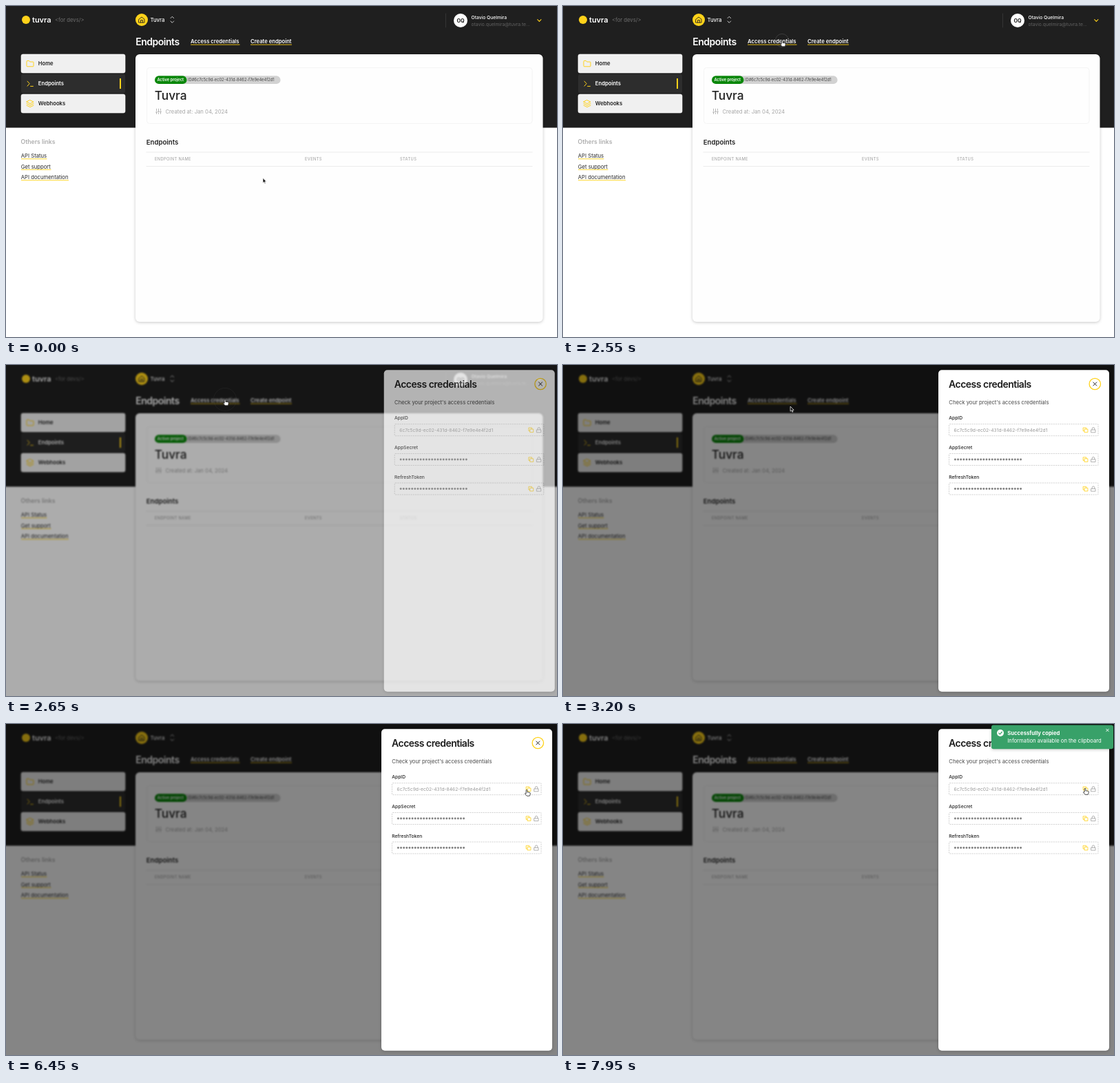
Write an HTML page that moves like this. It is 800 px wide and 480 px high and loops after 8000 ms.

```html
<!DOCTYPE html>
<html lang="en">
<head>
<meta charset="utf-8">
<title>Access credentials</title>
<style>
html, body { margin: 0; width: 100%; height: 100%; overflow: hidden; background: #fff; }
svg { display: block; width: 100vw; height: 100vh; }
text { font-family: Inter, sans-serif; white-space: pre; }
#card, #panel, #toast rect { filter: drop-shadow(0 1px 2px rgba(0,0,0,.22)); }
</style>
</head>
<body>
<svg id="stage" viewBox="0 0 800 480"></svg>
<script>
const LOOP = 8000;
const YELLOW = '#ffd21a';
const ID = '6c7c5c9d-ec02-431d-8462-f7e9e4e4f2d1';

const text = (x, y, size, fill, str, weight = 400, extra = '') =>
  `<text x="${x}" y="${y}" font-size="${size}" fill="${fill}" font-weight="${weight}" ${extra}>${str}</text>`;
const rect = (x, y, w, h, fill, r = 0, extra = '') =>
  `<rect x="${x}" y="${y}" width="${w}" height="${h}" rx="${r}" fill="${fill}" ${extra}/>`;
const circle = (x, y, r, fill, extra = '') =>
  `<circle cx="${x}" cy="${y}" r="${r}" fill="${fill}" ${extra}/>`;
const line = (d, color, width = 1, extra = '') =>
  `<path d="${d}" fill="none" stroke="${color}" stroke-width="${width}" stroke-linecap="round" stroke-linejoin="round" ${extra}/>`;
const at = (x, y, body) => `<g transform="translate(${x} ${y})">${body}</g>`;
const tracking = n => `letter-spacing="${n}"`;

function header() {
  return rect(-20, -20, 840, 196.5, '#1f1f1f') +
    circle(29, 20, 6, YELLOW) +
    text(38, 24, 11, '#fff', 'tuvra', 600) +
    text(71, 23.3, 7.68, '#6e6e6e', '&lt;for devs/&gt;') +
    circle(197, 20, 9, YELLOW) +
    at(197, 20, line('M-4 -.8L0 -4L4 -.8V4H-4ZM-1.4 4V.5H1.4V4', '#222', .9)) +
    text(209.5, 22.7, 7.68, '#fff', 'Tuvra', 500) +
    line('M239 17.6L241.3 15.3L243.6 17.6M239 22L241.3 24.3L243.6 22', '#ddd', .9) +
    line('M638.5 11V31', '#3a3a3a', .8) +
    circle(660, 21, 10, '#fff') +
    text(660, 23.6, 7.2, '#222', 'OQ', 700, 'text-anchor="middle"') +
    text(675.5, 18.6, 6.72, '#fff', 'Otavio Quelmira', 500) +
    text(675.5, 28.6, 6.72, '#626262', 'otavio.quelmira@tuvra.te...') +
    line('M771.7 19.7L774.3 22.3L776.9 19.7', YELLOW, 1.1) +
    text(188.3, 57, 14, '#fff', 'Endpoints', 600, tracking(-.5)) +
    text(268, 54.3, 7.68, '#fff', 'Access credentials', 600) +
    text(355, 54.3, 7.68, '#fff', 'Create endpoint', 600) +
    rect(268, 55.6, 71.5, .9, YELLOW) + rect(355, 55.6, 60, .9, YELLOW);
}

function sidebar() {
  const item = (y, label, icon, active) =>
    rect(22, y, 151, 27, active ? '#2d2d2d' : '#f0f0f0', 2.5, active ? '' : 'stroke="#fff" stroke-width=".6"') +
    at(35, y + 13.6, line(icon, YELLOW, 1)) +
    text(46.8, y + 16.4, 7.68, active ? '#fff' : '#222', label, 600);
  const link = (y, label, width) =>
    text(21.8, y, 7.68, '#2a2a2a', label) + rect(22, y + 1.3, width, .9, YELLOW);
  return item(70, 'Home', 'M-5 -3.4Q-5 -4.2-4.2 -4.2H-1.6L-.2 -2.6H4.2Q5 -2.6 5 -1.8V3.4Q5 4.2 4.2 4.2H-4.2Q-5 4.2-5 3.4Z') +
    item(99, 'Endpoints', 'M-4 -3.5L-.8 0L-4 3.5M.6 3.8H4.4', true) +
    rect(165, 105, 2, 15, YELLOW) +
    item(128, 'Webhooks', 'M0 -5L5 -2.5L0 0L-5 -2.5ZM-5 0L0 2.5L5 0M-5 2.5L0 5L5 2.5') +
    text(21.6, 200.4, 8.64, '#adadad', 'Others links', 600) +
    link(220, 'API Status', 37.5) + link(235.5, 'Get support', 43.5) + link(251, 'API documentation', 69);
}

function card() {
  const head = (x, label) => text(x, 224.3, 5.76, '#9b9b9b', label, 400, tracking(.36));
  return rect(188, 70, 591.5, 388, '#fefefe', 6, 'id="card"') +
    rect(204.5, 89.5, 559.5, 81, 'none', 4, 'stroke="#f1f1f1" stroke-width=".8"') +
    rect(240, 101.3, 158.5, 11.8, '#d2d2d2', 5.9) +
    rect(216, 101.3, 46.5, 11.8, '#0a870a', 5.9) +
    text(219.5, 109.3, 5.76, '#fff', 'Active project', 600) +
    text(264, 109.3, 5.76, '#444', 'ID#' + ID) +
    text(215.8, 136.4, 17.28, '#222', 'Tuvra', 500) +
    at(221.5, 152.8, line('M-3 -3.6V-.6M-3 1.2V3.6M0 -3.6V.4M0 2.2V3.6M3 -3.6V-1.4M3 .4V3.6M-4 1.2H-2M-1 .4H1M2 .4H4', '#a5a5a5', .8)) +
    text(231.5, 155.6, 7.68, '#a5a5a5', 'Created at: Jan 04, 2024') +
    text(203.8, 200.7, 9.6, '#222', 'Endpoints', 600) +
    line('M204 212H764M204 232.5H764', '#e6e6e6', .8) +
    head(216, 'ENDPOINT NAME') + head(434, 'EVENTS') + head(572, 'STATUS');
}

function drawer() {
  const dots = Array.from({ length: 24 }, (_, i) => circle(569.4 + i * 4.14, 0, 1.45, '#808080')).join('');
  const copy = line('M-1.2 -1.4H3.4V3.2H-1.2ZM-1.4 1.2H-3.4V-3.4H1.2V-1.6', YELLOW, .8);
  const lock = line('M-3 -.4H3V3.4H-3ZM-1.8 -.6V-2A1.8 1.8 0 0 1 1.8 -2V-.6', '#a0a0a0', .8);
  const field = (y, label, value) => text(560.3, y - 15, 6.72, '#222', label, 500) +
    rect(560.5, y - 8.5, 216.5, 17, '#fff', 1, 'stroke="#c6c6c6" stroke-width=".8" stroke-dasharray="2 1.2"') +
    at(0, y, value + at(758.5, .2, copy) + at(770, .2, lock));
  return rect(545, 7.3, 248, 466.5, '#fff', 5, 'id="panel"') +
    text(560, 33.2, 14, '#1c1c1c', 'Access credentials', 600, tracking(-.5)) +
    circle(772.3, 27.5, 8.2, '#fff', `stroke="${YELLOW}" stroke-width="1.3"`) +
    line('M769.8 25L774.8 30M774.8 25L769.8 30', '#222', 1) +
    text(560.3, 57, 7.68, '#4a4a4a', "Check your project's access credentials") +
    field(94.2, 'AppID', text(567.5, 2.4, 6.72, '#9a9a9a', ID)) +
    field(137, 'AppSecret', dots) + field(179.5, 'RefreshToken', dots);
}

function toast() {
  return rect(622, 1.5, 177, 34.8, '#38a169', 3) +
    circle(635, 13, 5, '#fff') + line('M632.8 13.2L634.4 14.8L637.3 11.5', '#38a169', 1.2) +
    text(645.3, 15.6, 7.68, '#fff', 'Successfully copied', 700) +
    text(645.3, 27.2, 7.68, '#fff', 'Information available on the clipboard') +
    line('M788.7 7.2L792.3 10.8M792.3 7.2L788.7 10.8', '#fff', .9);
}

const ARROW = 'M0 0V7.2L1.7 5.6L2.8 8.2L4 7.7L2.9 5.2H5.1Z';
const HAND = 'M-.9 .8A.9 .9 0 0 1 .9 .8V3.4Q4.8 3.2 5.2 4.6L5 7L4.2 8.8H.2L-2.4 6Q-2.7 4.8-1.6 5L-.9 5.6Z';

document.getElementById('stage').innerHTML =
  `<g id="page">${rect(-20, -20, 840, 520, '#fff')}${header()}${sidebar()}${card()}</g>` +
  rect(0, 0, 800, 480, '#000', 0, 'id="shade"') +
  `<g id="drawer">${drawer()}</g><g id="toast">${toast()}</g>` +
  circle(0, 0, 1, 'none', 'id="ring" stroke="#808080" stroke-width=".8"') +
  `<g id="cursor"><path id="arrow" d="${ARROW}" fill="#111" stroke="#fff" stroke-width=".7"/>` +
  `<path id="hand" d="${HAND}" fill="#fff" stroke="#222" stroke-width=".8"/></g>`;

const el = Object.fromEntries(['page', 'shade', 'drawer', 'toast', 'ring', 'cursor', 'arrow', 'hand']
  .map(id => [id, document.getElementById(id)]));

// time, x, y
const PATH = [
  [0, 373, 249.5], [1450, 326, 93.5], [2050, 318, 50], [2950, 318, 50], [3200, 330, 60],
  [3400, 363, 67], [3700, 541, 89], [3900, 541, 89], [4550, 697, 93.5], [4750, 698, 93.5],
  [5600, 751, 95], [6450, 756, 95.5], [6550, 756, 95.5], [7000, 758, 93.5], [LOOP, 758, 93.5]
];

const slope = (i, axis) => (PATH[i + 1][axis] - PATH[i][axis]) / (PATH[i + 1][0] - PATH[i][0]);

// Monotone tangent: no overshoot, full rest at stops.
function tangent(i, axis) {
  if (i === 0 || i === PATH.length - 1) return 0;
  const a = slope(i - 1, axis), b = slope(i, axis);
  return a * b > 0 ? 2 * a * b / (a + b) : 0;
}

function pointer(t, axis) {
  const i = Math.max(0, PATH.findIndex(k => k[0] > t) - 1);
  const [a, b] = [PATH[i], PATH[i + 1]];
  const d = b[0] - a[0], u = (t - a[0]) / d, v = 1 - u;
  return v * v * (1 + 2 * u) * a[axis] + u * v * v * d * tangent(i, axis) +
    u * u * (3 - 2 * u) * b[axis] - u * u * v * d * tangent(i + 1, axis);
}

function easeOut(t, start, length) {
  const u = Math.min(1, Math.max(0, (t - start) / length));
  return 1 - (1 - u) ** 2;
}

function slideIn(node, p) {
  node.setAttribute('opacity', p);
  node.setAttribute('transform', `translate(${11.5 * (1 - p)} 0)`);
}

function draw(t) {
  const open = easeOut(t, 2565, 200);
  el.page.style.filter = open ? `blur(${1.25 * open}px)` : 'none';
  el.shade.setAttribute('opacity', .48 * open);
  slideIn(el.drawer, open);
  slideIn(el.toast, easeOut(t, 7190, 350));

  const x = pointer(t, 1), y = pointer(t, 2);
  const onLink = x > 267 && x < 340 && y > 44 && y < 58;
  const isHand = onLink || x > 560;
  el.cursor.setAttribute('transform', `translate(${x} ${y})`);
  el.arrow.setAttribute('visibility', isHand ? 'hidden' : 'visible');
  el.hand.setAttribute('visibility', isHand ? 'visible' : 'hidden');

  const click = [2500, 7080].find(c => t >= c && t < c + 200);
  const u = click ? (t - click) / 200 : 1;
  el.ring.setAttribute('opacity', .5 * (1 - u));
  el.ring.setAttribute('r', 6 + 14 * u);
  el.ring.setAttribute('cx', x);
  el.ring.setAttribute('cy', y);
}

function tick() {
  draw(performance.now() % LOOP);
  requestAnimationFrame(tick);
}
tick();
</script>
</body>
</html>
```
